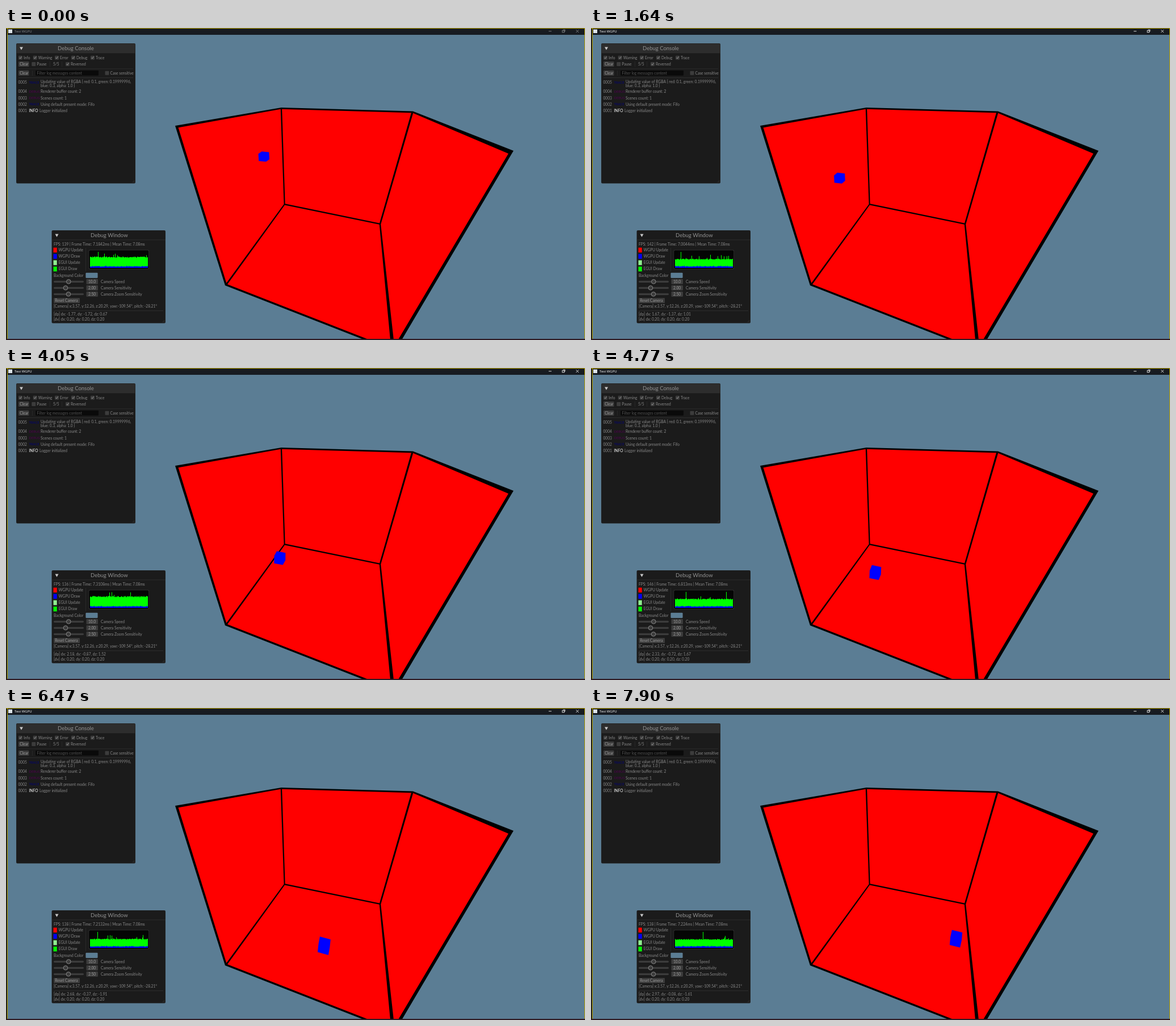
These frames come from a looping animation (1020 px wide and 549 px high, 7.99 s). An HTML page with a canvas:

```html
<!DOCTYPE html>
<html lang="en">
<head>
<meta charset="utf-8">
<title>Test WGPU</title>
<style>
html, body { margin: 0; width: 100%; height: 100%; overflow: hidden; background: #5b7d94; }
canvas { display: block; }
</style>
</head>
<body>
<canvas id="stage" width="1020" height="549"></canvas>
<script>
const ctx = document.getElementById('stage').getContext('2d');
const LOOP = 7990, STEP = 89.4, LAST = 88;
const SKY = '#5b7d94', GRAY = '#898989', LIGHT = '#9c9c9c', LINE = '#333', BUTTON = '#3c3c3c';

// Seconds at which the cube hits the x and z walls, and the curved legs between
const bounces = [0, 1.02, 6.2, 7.9];
const path = [[454.3, 226.2], [442.5, 238], [431, 250.2], [456.5, 305.7], [545, 417.5], [594, 422], [643, 406]];

const lerp = (a, b, f) => a + (b - a) * f;

function hash(n) {
  const s = Math.sin(n * 127.1 + 11.7) * 43758.5453;
  return s - Math.floor(s);
}

function rect(x, y, w, h, color, r = 0) {
  ctx.fillStyle = color;
  ctx.beginPath();
  ctx.roundRect(x, y, w, h, r);
  ctx.fill();
}

function trace(p) {
  ctx.beginPath();
  for (let i = 0; i < p.length; i += 2) ctx.lineTo(p[i], p[i + 1]);
}

function poly(color, ...p) {
  ctx.fillStyle = color;
  trace(p);
  ctx.fill();
}

function stroke(color, width, ...p) {
  ctx.strokeStyle = color;
  ctx.lineWidth = width;
  trace(p);
  ctx.stroke();
}

// y is the visual middle of the line
function text(s, x, y, color = GRAY, size = 6.65, family = 'Lato') {
  ctx.font = `${size}px ${family}, sans-serif`;
  ctx.fillStyle = color;
  ctx.fillText(s, x, y + size * 0.35);
}

function button(s, x, y, w) {
  rect(x, y - 4.5, w, 9, BUTTON, 1);
  text(s, x + 2.2, y, LIGHT);
}

function checkbox(s, x, y, on = true) {
  rect(x, y - 3.5, 7, 7, BUTTON, 1);
  if (on) stroke(LIGHT, 0.9, x + 1.6, y, x + 3, y + 1.7, x + 5.5, y - 1.8);
  text(s, x + 9, y);
}

function panel(title, x, y, w, h, titleX, barColor) {
  rect(x, y, w, h, '#262626', 2);
  rect(x + 0.6, y + 0.6, w - 1.2, h - 1.2, '#1b1b1b', 2);
  rect(x + 0.6, y + 0.6, w - 1.2, 16.4, barColor, 2);
  rect(x, y + 16.5, w, 0.7, LINE);
  poly('#c8c8c8', x + 6, y + 6.5, x + 12, y + 6.5, x + 9, y + 11.7);
  text(title, titleX, y + 8.3, '#929292', 9.5);
  for (const d of [3, 5.5]) stroke('#444', 0.6, x + w - d, y + h - 1.5, x + w - 1.5, y + h - d);
}

function room() {
  const red = '#f00';
  poly('#000', 298, 172, 485, 140, 717, 146.5, 894, 216, 697, 549, 632, 549, 386, 453);
  poly(red, 303.5, 175.2, 483.8, 142.8, 489.6, 310, 388.3, 448.7);
  poly(red, 486.2, 142.8, 714, 149.2, 658, 343.6, 491.7, 309.2);
  poly(red, 717.2, 149.8, 885, 221, 690.5, 549, 683, 549, 660.2, 345.5);
  poly(red, 491, 311.6, 657.8, 345.8, 677, 549, 641, 549, 390, 451);
}

function cubeCenter(t) {
  const leg = t < bounces[1] ? 0 : t < bounces[2] ? 1 : 2;
  const f = (t - bounces[leg]) / (bounces[leg + 1] - bounces[leg]);
  const [a, b, c] = path.slice(leg * 2);
  return a.map((v, i) => lerp(lerp(v, b[i], f), lerp(b[i], c[i], f), f));
}

// The silhouette stretches as the cube sinks towards the viewer
function cube(t) {
  const [x, y] = cubeCenter(t);
  const near = Math.max(0, (y - 226) / 192) ** 1.5;
  const half = [
    lerp(-3.7, -7.5, near), lerp(-9, -16.2, near),
    lerp(9, 11.4, near), lerp(-7.8, -11.2, near),
    lerp(9.8, 10, near), lerp(4.8, 2.4, near)
  ];
  const all = half.concat(half.map(v => -v));
  poly('#00f', ...all.map((v, i) => v + (i % 2 ? y : x)));
}

function titleBar(focused) {
  const color = focused ? '#fff' : '#8d8f92';
  rect(0, 0, 1020, 12, '#171b21');
  rect(0, 12, 2, 537, '#20211f');
  rect(0, 0, 1020, 1, '#b8a200');
  rect(2, 0, 1, 549, '#b8a200');
  rect(1019, 0, 1, 549, '#b8a200');
  rect(0, 547, 1020, 2, '#2c1822');
  rect(4, 2.5, 7, 6.5, '#dce3e8');
  text('Test WGPU', 15, 6, color, 6, 'Open Sans');
  stroke(color, 0.8, 956, 5.7, 961, 5.7);
  ctx.strokeRect(980, 4.3, 3.5, 3.5);
  stroke(color, 0.8, 981.3, 3, 984.8, 3, 984.8, 6.5);
  stroke(color, 0.8, 1004.2, 3.2, 1009, 8);
  stroke(color, 0.8, 1009, 3.2, 1004.2, 8);
}

function logLine(id, level, color, message, y, idY = y) {
  text(id, 21.5, idY);
  text(level, 40.5, idY, color, level === 'INFO' ? 6.65 : 5.8);
  text(message, level === 'INFO' ? 59 : 61, y);
}

function consolePanel() {
  panel('Debug Console', 18, 27, 210, 246.5, 91, '#2d2d2d');
  checkbox('Info', 22, 52.2);
  checkbox('Warning', 47.7, 52.2);
  checkbox('Error', 86, 52.2);
  checkbox('Debug', 115, 52.2);
  checkbox('Trace', 149, 52.2);
  button('Clear', 22, 63.5, 18.5);
  checkbox('Pause', 45.3, 63.5, false);
  rect(77, 59, 0.6, 9, LINE);
  text('5/5', 83, 63.5);
  rect(98.5, 59, 0.6, 9, LINE);
  checkbox('Reversed', 105, 63.5);
  rect(22, 71.5, 202, 0.7, LINE);
  button('Clear', 22, 79.3, 18.5);
  rect(46, 75, 0.6, 9, LINE);
  rect(52, 74.8, 111, 9, '#0a0a0a', 1);
  text('Filter log messages content', 54.5, 79.3, '#555');
  checkbox('Case sensitive', 174.5, 79.3, false);
  rect(22, 87, 202, 0.7, LINE);

  const blue = '#000078', purple = '#500050';
  logLine('0005', 'TRACE', blue, 'Updating value of RGBA { red: 0.1, green: 0.19999996,', 95, 96);
  text('blue: 0.3, alpha: 1.0 }', 61, 102);
  logLine('0004', 'DEBUG', purple, 'Renderer buffer count: 2', 112);
  logLine('0003', 'DEBUG', purple, 'Scenes count: 1', 123.2);
  logLine('0002', 'TRACE', blue, 'Using default present mode: Fifo', 134.4);
  logLine('0001', 'INFO', '#fff', 'Logger initialized', 145.6);
}

// Rolling history of frame times, scaled to its own maximum
function chart(k) {
  rect(145.5, 390.5, 106.5, 34, LINE, 2);
  rect(146.2, 391.2, 105.1, 32.6, '#050505', 2);
  const values = Array.from({ length: 102 }, (_, i) => {
    const n = i + 12 * k, rare = hash(n + 0.5);
    const spike = rare > 0.995 ? 0.9 : rare > 0.94 ? 0.1 + 0.4 * hash(n + 0.25) : 0;
    return 1 + 0.12 * hash(n) + spike;
  });
  const scale = 28 / Math.max(1.5, ...values);
  values.forEach((v, i) => {
    const h = v * scale, blue = 2.2 + 1.4 * hash(i + 12 * k + 0.75) ** 3;
    rect(148 + i, 422 - h, 1, h, '#0f0');
    rect(148 + i, 422 - blue, 1, blue, '#00f');
  });
}

function slider(label, value, thumb, y) {
  rect(84, y - 1.6, 53, 3.2, BUTTON, 1.6);
  ctx.beginPath();
  ctx.arc(thumb, y, 3.8, 0, 7);
  ctx.fillStyle = BUTTON;
  ctx.fill();
  ctx.strokeStyle = LIGHT;
  ctx.lineWidth = 0.8;
  ctx.stroke();
  rect(141.5, y - 4.5, 20.5, 9, BUTTON, 1);
  text(value, 145, y, LIGHT);
  text(label, 167, y);
}

// Readouts rise steadily; x and z change sign when the cube bounces
function readout(t) {
  const y = -1.72 + 0.213 * t - 0.0007 * t * t;
  const x = y + (t < bounces[1] ? -0.05 : 3.047);
  const z = y + (t < bounces[2] ? 2.386 : -1.5335);
  return `[dp] dx: ${x.toFixed(2)}, dy: ${y.toFixed(2)}, dz: ${z.toFixed(2)}`;
}

function debugPanel(k, t) {
  panel('Debug Window', 80.5, 356, 200.5, 163.5, 149, '#1b1b1b');
  const time = (6.75 + 0.6 * hash(k + 500)).toFixed(k % 3 ? 3 : 4);
  text(`FPS: ${Math.floor(1000 / time)} | Frame Time: ${time}ms | Mean Time: 7.08ms`, 84, 380.3);
  const legend = { 'WGPU Update': '#f00', 'WGPU Draw': '#00f', 'EGUI Update': '#90ee90', 'EGUI Draw': '#0f0' };
  Object.entries(legend).forEach(([label, color], i) => {
    rect(83.5, 386.5 + 11.1 * i, 6.2, 8.5, color);
    text(label, 92.5, 390.7 + 11.1 * i);
  });
  rect(140, 387, 0.6, 41, LINE);
  chart(k);
  text('Background Color', 84, 435.2);
  rect(140.5, 430.7, 21, 9, '#6e8da2', 1);
  rect(141, 431.2, 20, 8, SKY, 1);
  slider('Camera Speed', '10.0', 110.3, 446.3);
  slider('Camera Sensitivity', '2.00', 105, 457.3);
  slider('Camera Zoom Sensitivity', '2.50', 110, 468.3);
  button('Reset Camera', 84, 479.5, 46);
  text('[Camera] x:3.57, y:12.26, z:20.29, yaw:-109.54°, pitch: -28.21°', 84, 489.7);
  rect(84, 497, 193, 0.7, LINE);
  text(readout(t), 84, 503.3);
  text('[dv] dx: 0.20, dy: 0.20, dz: 0.20', 84, 512.3);
}

function draw(ms) {
  const k = Math.max(0, Math.min(LAST, Math.floor((ms - 20) / STEP)));
  const t = k ? 0.02 + 0.08955 * k : 0;
  rect(0, 0, 1020, 549, SKY);
  room();
  cube(t);
  titleBar(k > 0);
  consolePanel();
  debugPanel(k, t);
}

const start = performance.now();
function tick() {
  draw((performance.now() - start) % LOOP);
  requestAnimationFrame(tick);
}
tick();
</script>
</body>
</html>
```
